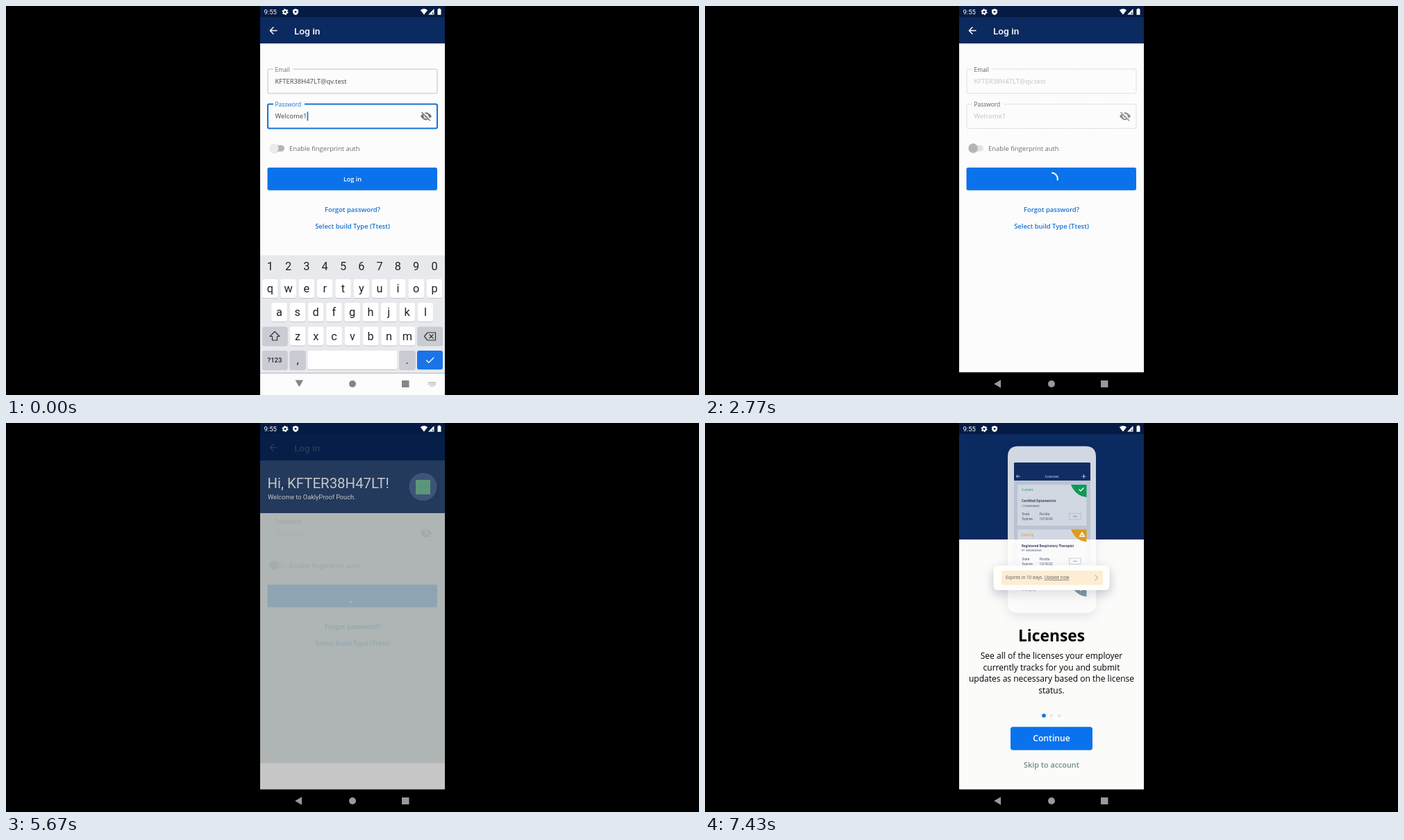
Recreate the animation shown at these times as an HTML page. Size 998x561 px, loop 8 s.

```html
<!DOCTYPE html>
<html lang="en">
<head>
<meta charset="utf-8">
<title>Log in</title>
<style>
html, body { margin: 0; width: 100%; height: 100%; overflow: hidden; background: #000; }
svg { display: block; width: 998px; height: 561px; font: 9.45px "Open Sans", "Noto Sans", sans-serif; }
.roboto { font-family: Roboto, sans-serif; }
.mid { text-anchor: middle; }
.semi { font-weight: 600; }
.bold { font-weight: 700; }
.line { fill: none; stroke-linecap: round; stroke-linejoin: round; }
.field { fill: none; stroke: #bfc1cb; }
.label { font-size: 8.4px; fill: #707078; }
.value { fill: #444; }
.track { fill: #b4b4b4; }
.thumb { fill: #ececec; }
.focus .field { stroke: #1673d6; stroke-width: 2; }
.focus .label { fill: #1673d6; }
.off .field { stroke: #d2d2d2; stroke-width: 1; stroke-dasharray: 2 1; }
.off .label { fill: #606060; }
.off .value { fill: #c2c2c2; }
.off .track { fill: #e3e3e3; }
.off .thumb { fill: #b5b5b5; }
#phone { font-size: 4.6px; fill: #34405e; filter: drop-shadow(0 6px 7px rgba(40, 50, 80, .13)); }
#popup { filter: drop-shadow(0 5px 8px rgba(40, 50, 80, .15)); }
</style>
</head>
<body>
<svg viewBox="0 0 998 561">
  <defs>
    <clipPath id="stage"><rect x="366" width="266" height="561"/></clipPath>
    <clipPath id="glass"><rect x="445" y="57" width="110" height="194" rx="2"/></clipPath>
  </defs>
  <rect width="998" height="561"/>
  <g clip-path="url(#stage)">
    <g id="login">
      <path fill="#fcfcfc" d="M365 54h268v474.500h-268z"/>
      <path fill="#0b2a5f" d="M365 16h268v38h-268z"/>
      <path class="line" stroke="#fff" stroke-width="1.400" d="M390 35.500h-9.500m4.500-4.700l-4.700 4.700l4.700 4.700"/>
      <text class="roboto" x="415" y="40.500" font-size="13.600" font-weight="500" fill="#fff">Log in</text>
      <g id="form">
        <rect class="field" x="377" y="91" width="244" height="35" rx="2"/>
        <path fill="#fcfcfc" d="M385 88h28v6h-28z"/>
        <text class="label" x="387.500" y="94.700">Email</text>
        <text class="value" x="387.500" y="112">KFTER38H47LT@qv.test</text>
        <g class="focus">
          <rect class="field" x="377" y="141.500" width="244" height="35" rx="2"/>
          <path fill="#fcfcfc" d="M385 138h45v7h-45z"/>
          <text class="label" x="387.500" y="145.200">Password</text>
        </g>
        <text class="value" x="387.500" y="162.300">Welcome1</text>
        <path id="caret" fill="#1673d6" d="M433.600 152.500h1.600v13h-1.600z"/>
        <g id="eye">
          <path fill="#6f6f6f" d="M597 159q8-11 16 0q-8 11-16 0"/>
          <circle cx="605" cy="159" r="2.900" fill="#6f6f6f" stroke="#fcfcfc" stroke-width="1.300"/>
          <path stroke="#fcfcfc" stroke-width="3.200" d="M599 152.500l12.500 12.500"/>
          <path stroke="#6f6f6f" stroke-width="1.400" d="M598.500 153l12.500 12.500"/>
        </g>
        <rect class="track" x="380" y="200.700" width="21" height="9" rx="4.500"/>
        <circle cx="386.500" cy="206" r="6.800" fill="#000" opacity=".1"/>
        <circle class="thumb" cx="386" cy="205" r="6.700"/>
        <text x="408" y="208.500" fill="#6f6f6f">Enable fingerprint auth</text>
      </g>
      <rect x="376.500" y="233" width="244.500" height="32.700" rx="2.500" fill="#0a72ea"/>
      <text id="submit" class="mid semi" x="499" y="253" font-size="9.100" fill="#fff">Log in</text>
      <circle id="spinner" fill="none" r="8.800" pathLength="360" stroke="#fff" stroke-width="2"/>
      <g class="mid semi" fill="#1673d2">
        <text x="499" y="297.300">Forgot password?</text>
        <text x="499" y="320.800">Select build Type (Ttest)</text>
      </g>
    </g>

    <g id="home">
      <path fill="#dae5e4" d="M365 130h268v361h-268z"/>
      <path fill="#fff" d="M365 490.500h268v38h-268z"/>
      <path fill="#06285c" d="M365 0h268v130h-268z"/>
      <g class="roboto" fill="#fff">
        <text x="376.500" y="94" font-size="20.400">Hi, KFTER38H47LT!</text>
        <text x="377" y="109.500" font-size="9.200">Welcome to OaklyProof Pouch.</text>
      </g>
      <circle cx="600.500" cy="92" r="20" fill="#2f4f86"/>
      <rect x="590" y="82" width="21" height="21" fill="#5cb48c"/>
    </g>
    <path id="dim" d="M365 0h268v528.500h-268z"/>

    <g id="intro">
      <path fill="#fbfbfa" d="M365 168h268v360.500h-268z"/>
      <path fill="#0b2a60" d="M365 0h268v168h-268z"/>
      <g id="phone">
        <path fill="#fff" opacity=".82" fill-rule="evenodd" d="M451 33.500h97q15 0 15 15v210.500q0 15-15 15h-97q-15 0-15-15v-210.500q0-15 15-15zM445 57v194h110v-194z"/>
        <g clip-path="url(#glass)">
          <path fill="#fff" opacity=".72" d="M445 57h110v194h-110z"/>
          <path fill="#102c62" d="M445 57h110v26h-110z"/>
          <path class="line" stroke="#fff" stroke-width=".700" d="M453.500 77h-5m2-2l-2 2l2 2m92.500-2h5m-2.500-2.500v5"/>
          <text class="mid" x="499.500" y="79" font-size="5" fill="#dfe5f0">Licenses</text>
          <g id="cards"></g>
        </g>
        <g id="popup">
          <rect x="415.500" y="205.500" width="167" height="35.500" rx="6" fill="#fffefb"/>
          <rect x="427" y="213" width="146" height="20.500" rx="2" fill="#fdedd3"/>
          <text x="433" y="225.300" font-size="6.300" fill="#555">Expires in 10 days. <tspan text-decoration="underline">Update now</tspan></text>
          <path class="line" stroke="#999" d="M562 219.500l3.500 3.700l-3.500 3.700"/>
        </g>
      </g>
      <text class="mid bold" x="499" y="314.700" font-size="22.800">Licenses</text>
      <g id="blurb" class="mid" font-size="12.050"></g>
      <circle cx="488" cy="422" r="2.800" fill="#0f73dc"/>
      <circle cx="499" cy="422" r="2.300" fill="#e6e6e9"/>
      <circle cx="510" cy="422" r="2.300" fill="#e6e6e9"/>
      <rect x="440" y="438.300" width="118" height="33.400" rx="3.500" fill="#0a72ef"/>
      <text class="mid semi" x="499" y="459.300" font-size="12.200" fill="#fff">Continue</text>
      <text class="mid semi" x="499" y="497" font-size="10.800" fill="#6e8b86">Skip to account</text>
    </g>

    <path fill="#061b43" d="M365 0h268v16h-268z"/>
    <g fill="#fff">
      <text class="roboto" x="371.500" y="12" font-size="9.500">9:55</text>
      <circle cx="402" cy="8.500" r="2.500" fill="none" stroke="#fff" stroke-width="1.800"/>
      <circle cx="402" cy="8.500" r="3.900" fill="none" stroke="#fff" stroke-width="1.300" stroke-dasharray="2.040"/>
      <path d="M417 4l4 1.500v3q0 3-4 4.500q-4-1.500-4-4.500v-3z"/>
      <circle cx="417" cy="8.300" r="1.400" fill="#061b43"/>
      <path d="M596.800 6q5.200-4 10.400 0l-5.200 6.500zM616.500 4v8.500h-8.500zM621.500 4.500h1.300v-1h2.400v1h1.300v8.200h-5z"/>
      <path fill="#061b43" d="M614 9.500h1.300v2h-1.300z"/>
    </g>

    <path d="M365 528.500h268v33h-268z"/>
    <g id="keyboard">
      <path fill="#e7e9ed" d="M365 359.500h268v170h-268z"/>
      <g id="keys" class="roboto mid" font-size="16.300" fill="#202124"></g>
      <path class="line" stroke="#333" stroke-width="1.200" d="M387 469.500l7 7h-3.500v5.500h-7v-5.500h-3.500z"/>
      <path class="line" stroke="#333" stroke-width="1.200" d="M607 471h11.500v11h-11.500l-4.500-5.500zm3 3l5 5m0-5l-5 5"/>
      <path class="line" stroke="#fff" stroke-width="1.300" d="M605.500 511l3.300 3.300l7-7"/>
    </g>
    <g id="imeNav">
      <path fill="#fcfcfc" d="M365 529.500h268v32h-268z"/>
      <path fill="#858585" d="M416.500 539.500h11.500l-5.700 10z"/>
      <path stroke="#999" stroke-width="1.300" stroke-dasharray="1.500 .7" fill="none" d="M608.500 543h11m-11 2.300h11m-9 2.500h7"/>
    </g>
    <path id="back" fill="#999" d="M426 539.300v11.400l-9.800-5.700z"/>
    <g id="buttons" fill="#999"><circle cx="499" cy="545" r="5"/><path d="M570 540h10.500v10h-10.500z"/></g>
  </g>
</svg>
<script>
const $ = id => document.getElementById(id);
const show = (id, on) => $(id).setAttribute('visibility', on ? 'visible' : 'hidden');
const fade = (id, v) => $(id).setAttribute('opacity', v);
const text = (x, y, s, attrs = '') => `<text x="${x}" y="${y}" ${attrs}>${s}</text>`;

// Keyboard
const STEP = 26.3;
const key = (x, y, w, h, fill) =>
  `<rect x="${x}" y="${y + 1}" width="${w}" height="${h}" rx="3" fill="#c3c6cb"/>` +
  `<rect x="${x}" y="${y}" width="${w}" height="${h}" rx="3" fill="${fill}"/>`;
const row = (chars, x, y, boxed = true) => [...chars].map((c, i) => {
  const cx = x + i * STEP;
  return (boxed ? key(cx - 11.3, y - 13.5, 22.6, 27, '#fff') : '') + text(cx, y + 5.5, c);
}).join('');
$('keys').innerHTML =
  row('1234567890', 380.3, 375.5, false) + row('qwertyuiop', 380.3, 407.5) +
  row('asdfghjkl', 393.5, 441.5) + row('zxcvbnm', 420, 476) +
  key(369, 462.5, 36.5, 27, '#c9ccd2') + key(592.5, 462.5, 36.5, 27, '#c9ccd2') +
  key(369, 497, 36.5, 27, '#c9ccd2') + key(408.5, 497, 23, 27, '#c9ccd2') +
  key(434.5, 497, 129, 27, '#fff') + key(566, 497, 23.5, 27, '#c9ccd2') +
  key(592, 497, 37, 27, '#1a73e8') +
  text(387, 514, '?123', 'font-size="9.5" font-weight="500"') + text(420, 516, ',') + text(577.7, 516, '.');

// Onboarding
$('blurb').innerHTML = [
  'See all of the licenses your employer', 'currently tracks for you and submit',
  'updates as necessary based on the license', 'status.'
].map((s, i) => text(499, 339.7 + i * 16.8, s)).join('');

const card = (y, color, state, title, id, date, mark) => `<g transform="translate(450 ${y})">
  <rect width="99.5" height="59" rx="1" fill="#fff" opacity=".35"/>
  <path d="M77 0h22.500v18q-16-2-22.500-18" fill="${color}"/>
  <path d="${mark}" class="line" stroke="#fff" stroke-width="1.300"/>` +
  text(6, 9.3, state, `fill="${color}"`) + text(6, 25, title, 'class="bold"') + text(6, 31.5, id, 'font-size="4"') +
  text(6.5, 44, 'State') + text(31.5, 44, 'Florida') + text(6.5, 51, 'Expires') + text(31.5, 51, date) +
  `<rect x="74.500" y="41.500" width="16.500" height="8.500" fill="none" stroke="#a9b2c4" stroke-width=".6"/>
  <path stroke="#34405e" stroke-dasharray="1 1" d="M80.500 45.800h5"/></g>`;
const tick = 'M89 7l2 2l4-4.300', alert = 'M93 4l-3.500 6h7zm0 2.500v1.500';
$('cards').innerHTML =
  card(89, '#0d9a56', 'Current', 'Certified Optometrist', 'C1########', '10/18/24', tick) +
  card(153.5, '#e09a1c', 'Expiring', 'Registered Respiratory Therapist', 'RT 3########', '10/18/22', alert) +
  card(232.5, '#7f97a3', 'Changing', '', '', '', tick);

// Motion
const seg = (t, a, b) => Math.min(1, Math.max(0, (t - a) / (b - a)));

// cubic-bezier(.4, 0, .2, 1)
function ease(x) {
  let lo = 0, hi = 1, s = .5;
  for (let i = 0; i < 20; i++) {
    s = (lo + hi) / 2;
    const at = 1.2 * (1 - s) ** 2 * s + .6 * (1 - s) * s * s + s ** 3;
    if (at < x) lo = s; else hi = s;
  }
  return s * s * (3 - 2 * s);
}

const CAP = 10; // degrees the square caps add at either end

function spin(t) {
  const p = (t - 1809) / 1333 % 1;
  const tail = ease(seg(p, .5, 1)), head = ease(seg(p, 0, .5));
  const turn = 95 + (t - 4700) * (t < 4700 ? .174 : .1165);
  const start = turn + 90 * p + 270 * tail - CAP;
  $('spinner').setAttribute('transform', `translate(499 249.3) rotate(${start - 90})`);
  $('spinner').setAttribute('stroke-dasharray', `${270 * (head - tail) + 2 * CAP} 360`);
}

function draw(t) {
  const busy = t >= 2450;
  $('form').setAttribute('class', busy ? 'off' : '');
  fade('eye', busy ? .8 : 1);
  show('caret', !busy && !(t >= 770 && t < 1270) && !(t >= 1770 && t < 2270));
  show('submit', !busy);
  show('spinner', busy);
  if (busy) spin(t);

  const drop = seg(t, 2450, 2650);
  $('keyboard').setAttribute('transform', `translate(0 ${202 * drop * drop})`);
  fade('keyboard', 1 - drop);
  fade('imeNav', 1 - seg(t, 2550, 2700));
  fade('back', seg(t, 2550, 2700));
  $('buttons').setAttribute('fill', t < 2600 ? '#858585' : '#999');

  fade('home', seg(t, 5500, 5705));
  fade('dim', .22 * seg(t, 5580, 5670));
  fade('intro', seg(t, 5710, 5920));
  fade('phone', seg(t, 6780, 7100));
}

function loop() {
  draw(performance.now() % 8000);
  requestAnimationFrame(loop);
}
loop();
</script>
</body>
</html>
```
